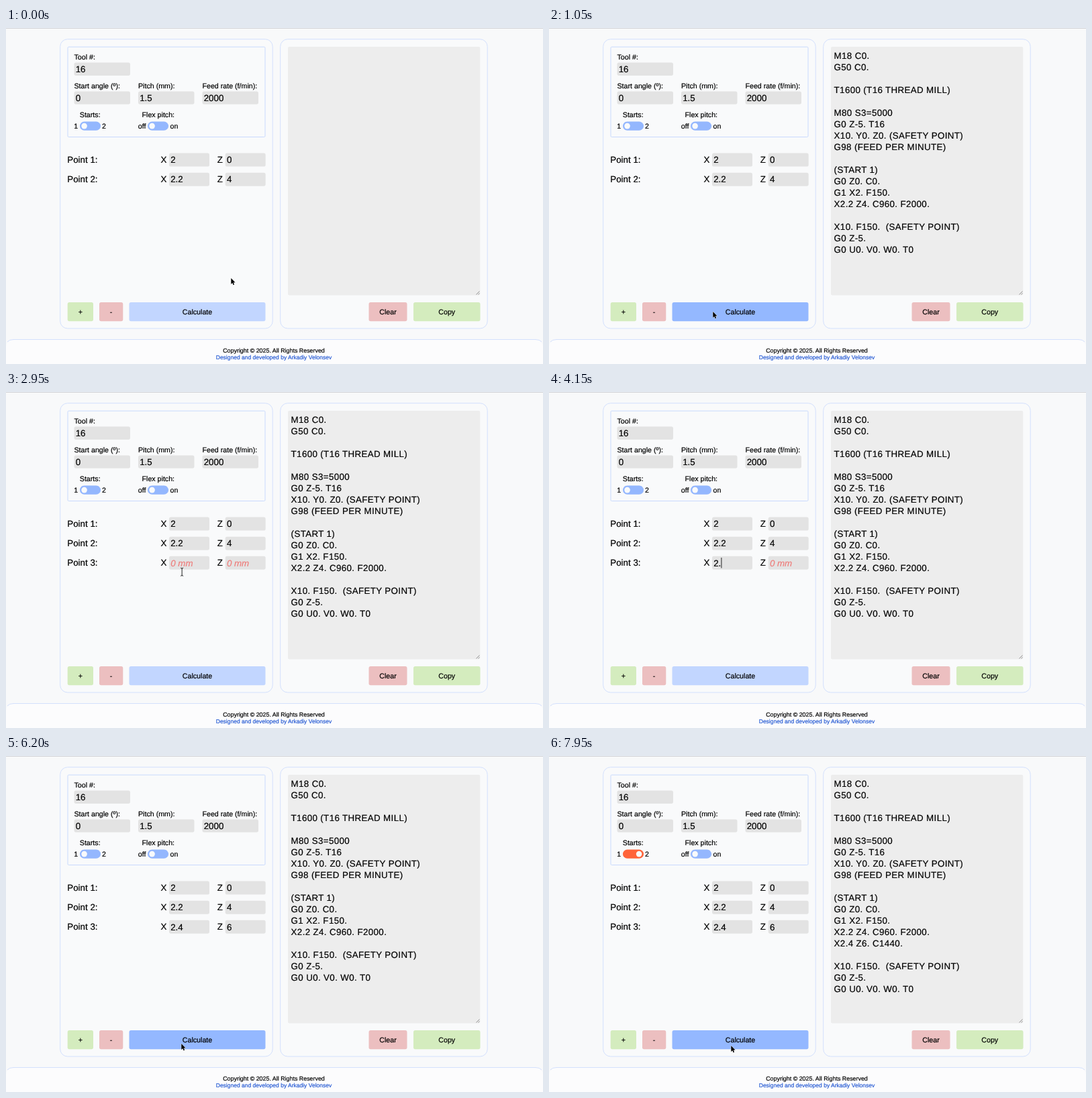
An HTML page that plays this animation: 800x501 px, repeating every 8000 ms.

```html
<!DOCTYPE html>
<html lang="en">
<head>
<meta charset="utf-8">
<title>Thread calculator</title>
<style>
  html, body { margin: 0; width: 100%; height: 100%; overflow: hidden; background: #f8f9fa; }
  svg { display: block; width: 800px; height: 501px; }
  text {
    font-family: "Liberation Sans", Arial, sans-serif; font-size: 10.67px; white-space: pre;
    fill: #000; stroke: #000; stroke-width: .2px; text-rendering: geometricPrecision;
  }
  .big { font-size: 13.33px; }
  .code { font-size: 13.33px; letter-spacing: .37px; }
  .hint { font-size: 13.33px; font-style: italic; fill: #ee7f7d; stroke: #ee7f7d; }
  .mid { text-anchor: middle; }
  .rights { font-size: 8.89px; }
  .credit { font-size: 8.5px; fill: #2459d3; stroke: #2459d3; }
</style>
</head>
<body>
<svg id="stage" viewBox="0 0 800 501"></svg>
<script>
const LOOP = 8000;
const stage = document.getElementById('stage');

function add(tag, attrs, parent = stage) {
  const node = document.createElementNS('http://www.w3.org/2000/svg', tag);
  for (const key in attrs) node.setAttribute(key, attrs[key]);
  parent.append(node);
  return node;
}
const box = (x, y, width, height, rx, fill, stroke = 'none', parent = stage) =>
  add('rect', { x, y, width, height, rx, fill, stroke }, parent);
function label(x, y, content, cls = '', parent = stage) {
  const node = add('text', { x, y, class: cls }, parent);
  node.textContent = content;
  return node;
}
const show = (node, on) => node.setAttribute('visibility', on ? 'visible' : 'hidden');

// Page, panels and footer
const LINE = '#d3e0fd';
box(0, 0, 800, 501, 0, '#f8f9fa');
box(0, 0, 800, 1, 0, '#d3d4d7');
box(80.7, 16.7, 316.5, 431.3, 11, '#f9fafb', LINE);
box(408.7, 16.7, 308.5, 431.3, 11, '#f9fafb', LINE);
box(92, 28.2, 294, 134.3, 1.5, 'none', '#c9dafd');
box(0, 464.5, 800, 60, 11, '#fcfcfd');
add('path', { d: 'M2 468Q5 464.5 11 464.5H789Q795 464.5 798 468', fill: 'none', stroke: LINE });
label(399, 483.9, 'Copyright © 2025. All Rights Reserved', 'mid rights');
label(399, 493.9, 'Designed and developed by Arkadiy Velonsev', 'mid credit');

// Settings
function field(x, y, width, height, value, parent) {
  box(x, y, width, height, 2.7, '#e3e3e3', 'none', parent);
  return label(x + 2.2, y + height / 2 + 4.7, value, 'big', parent);
}
label(101.5, 47.4, 'Tool #:');
label(101.5, 90.2, 'Start angle (º):');
label(197, 90.2, 'Pitch (mm):');
label(292.5, 90.2, 'Feed rate (f/min):');
field(101.5, 51.6, 83.5, 19.4, '16');
field(101.5, 94.4, 83.5, 19.4, '0');
field(197, 94.4, 83.5, 19.4, '1.5');
field(292.5, 94.4, 83.5, 19.4, '2000');
label(109.8, 133, 'Starts:');
label(202.5, 133, 'Flex pitch:');
label(101.3, 149.6, '1');
label(143, 149.6, '2');
label(196.8, 149.6, 'off');
label(244.5, 149.6, 'on');

function toggle(x) {
  return {
    track: box(x, 139.5, 31, 13.3, 6.65, '#94b7fe'),
    knob: add('circle', { cx: x + 6.6, cy: 146.1, r: 4.3, fill: '#f9fafb' })
  };
}
const starts = toggle(110);
toggle(211);

// Point rows
function pointRow(index, x, z) {
  const top = 158 + index * 29.1, row = add('g', {});
  label(91.3, top + 14, `Point ${index}:`, 'big', row);
  label(230.5, top + 14, 'X', 'big', row);
  label(314.7, top + 14, 'Z', 'big', row);
  return { row, x: field(243, top - .5, 60, 20, x, row), z: field(326.7, top - .5, 60, 20, z, row) };
}
pointRow(1, '2', '0');
pointRow(2, '2.2', '4');
const third = pointRow(3, '', '');
const caret = box(0, 247, 1, 15.5, 0, '#222');

// Program output
box(420, 28, 286.3, 370.5, 2, '#ededed');
add('path', { d: 'M700.5 397.5l5-5M703.5 397.5l2-2', stroke: '#777', 'stroke-width': .8 });
const head = ['M18 C0.', 'G50 C0.', '', 'T1600 (T16 THREAD MILL)', '', 'M80 S3=5000', 'G0 Z-5. T16',
  'X10. Y0. Z0. (SAFETY POINT)', 'G98 (FEED PER MINUTE)', '', '(START 1)', 'G0 Z0. C0.',
  'G1 X2. F150.', 'X2.2 Z4. C960. F2000.'];
const tail = ['', 'X10. F150.  (SAFETY POINT)', 'G0 Z-5.', 'G0 U0. V0. W0. T0'];
function program(lines) {
  const group = add('g', {});
  lines.forEach((line, i) => label(424.6, 46.4 + i * 16.98, line, 'code', group));
  return group;
}
const shortProgram = program([...head, ...tail]);
const longProgram = program([...head, 'X2.4 Z6. C1440.', ...tail]);

// Buttons
function button(x, width, text, color) {
  const face = box(x, 409, width, 28.3, 2.7, color);
  label(x + width / 2, 426.7, text, 'mid');
  return face;
}
const GREEN = [212, 236, 190], DARK_GREEN = [166, 195, 141];
const BLUE = [194, 214, 255], DARK_BLUE = [148, 184, 255], ORANGE = [255, 100, 58];
const rgb = c => `rgb(${c.join()})`;
const plus = button(91.7, 38.3, '+', rgb(GREEN));
button(139, 35.3, '-', '#ecbfc0');
const calculate = button(183.5, 203, 'Calculate', rgb(BLUE));
button(540.5, 57, 'Clear', '#ecbfc0');
button(607, 99.5, 'Copy', rgb(GREEN));

const arrow = add('path', {
  d: 'M.3 0V8.9L2.3 7.1L3.6 10.2L5.1 9.5L3.8 6.5H6.5Z',
  fill: '#000', stroke: '#fff', 'stroke-width': .9, 'paint-order': 'stroke'
});
const beam = add('path', {
  d: 'M-2 -6Q0 -6 0 -4.5Q0 -6 2 -6M0 -4.5V4.5M-2 6Q0 6 0 4.5Q0 6 2 6',
  fill: 'none', stroke: '#222', 'stroke-width': 1
});

// Pointer stops: time, x, y
const stops = [
  [0, 335, 373], [50, 335, 373], [520, 244, 423], [1500, 244, 423], [2000, 111, 425],
  [2450, 111, 425], [3050, 274, 256], [5400, 274, 256], [6000, 261, 429], [6350, 261, 429],
  [6700, 227, 316], [7100, 127, 146], [7400, 127, 146], [7850, 271, 432], [8000, 271, 432]
];
const clamp = v => Math.max(0, Math.min(1, v));
const ease = v => v * v * (3 - 2 * v);
const ramp = (t, start, length) => ease(clamp((t - start) / length));
const within = (t, from, to) => t >= from && t < to;
const mix = (a, b, k) => rgb(a.map((v, i) => Math.round(v + (b[i] - v) * k)));
const hover = (t, from, to) => ramp(t, from, 200) - ramp(t, to, 200);

function pointer(t) {
  const i = stops.findIndex(s => s[0] > t);
  const [t0, x0, y0] = stops[i - 1], [t1, x1, y1] = stops[i];
  const k = ramp(t, t0, t1 - t0);
  return [x0 + (x1 - x0) * k, y0 + (y1 - y0) * k];
}

function fill(node, value) {
  node.textContent = value || '0 mm';
  node.setAttribute('class', value ? 'big' : 'hint');
}

function draw(t) {
  const [px, py] = pointer(t);
  const overField = within(t, 2950, 5500);
  for (const node of [arrow, beam]) node.setAttribute('transform', `translate(${px} ${py})`);
  show(arrow, !overField);
  show(beam, overField && !within(t, 3800, 5400));

  calculate.setAttribute('fill', mix(BLUE, DARK_BLUE,
    hover(t, 350, 1620) + hover(t, 5850, 6400) + hover(t, 7650, LOOP)));
  plus.setAttribute('fill', mix(GREEN, DARK_GREEN, hover(t, 1850, 2550)));

  show(shortProgram, within(t, 750, 6300));
  show(longProgram, t >= 6300);

  show(third.row, t >= 2350);
  const typed = '2.4'.slice(0, [3850, 4100, 4350].filter(at => t >= at).length);
  fill(third.x, typed);
  fill(third.z, t >= 5050 ? '6' : '');
  const inZ = t >= 4700;
  const caretX = inZ ? 329 + (t >= 5050 ? 7.6 : 0) : 245.3 + [0, 7.4, 11.1, 18.5][typed.length];
  caret.setAttribute('x', caretX);
  show(caret, within(t, 3250, 6150) && (within(t, 3800, 5400) || (t - 3250) % 1000 < 500));

  const on = ramp(t, 7200, 250);
  starts.track.setAttribute('fill', mix([148, 183, 254], ORANGE, on));
  starts.knob.setAttribute('cx', 116.6 + 17.5 * on);
}

const begin = performance.now();
function tick() {
  draw((performance.now() - begin) % LOOP);
  requestAnimationFrame(tick);
}
tick();
</script>
</body>
</html>
```
